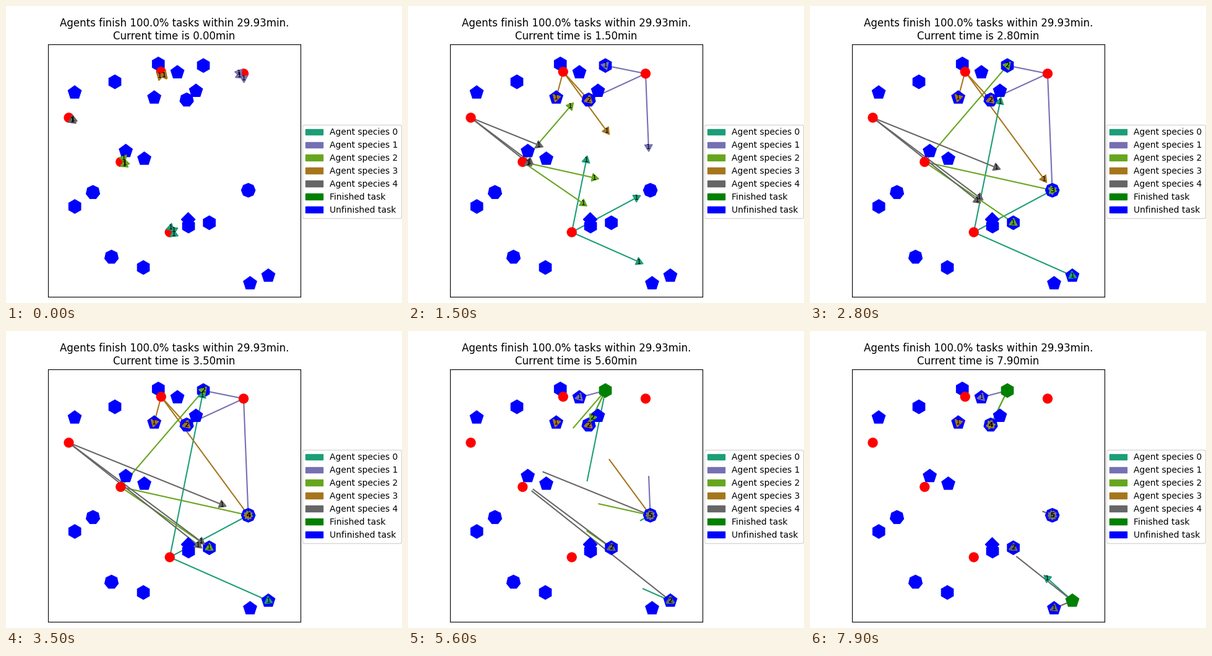
A matplotlib script that plays this animation: 640x480 px, repeating every 8000 ms.

```python
import numpy as np
import matplotlib.pyplot as plt
from matplotlib.animation import FuncAnimation
from matplotlib.patches import Circle, Patch, RegularPolygon

FRAMES, INTERVAL = 80, 100
UNIT = 408 / 110          # pixels per map unit
SPEED = 2 * UNIT          # pixels per step
TRAIL = 40                # steps of visible path

COLORS = plt.get_cmap("Dark2")(np.linspace(0, 1, 5))
DEPOTS = [(264.7, 365.6), (384, 109.3), (185.3, 252), (250.7, 106.2), (101.5, 180.5)]

# Tasks that agents visit
NORTH, MID = (319, 96.2), (328.6, 350.3)
TOP, LEFT = (277, 107.3), (239.6, 148.1)
SOUTH, CORNER = (424, 436), (394.5, 448.3)
HEPTA, EAST = (292, 151.7), (391.6, 297.8)

# All tasks by number of sides
TASKS = {
    4: [(294.5, 345)],
    5: [TOP, LEFT, SOUTH, CORNER, (111, 140), (307, 137.3), (193.6, 234.6), (223.5, 247)],
    6: [NORTH, MID, (246.2, 93.7), (176, 122.5), (111.2, 324), (295, 355.7), (222, 422.6)],
    7: [HEPTA, (140.5, 301.2), (170.5, 405.7)],
    8: [EAST],
}

# Species sent to each task, then the work and next stops once the team is complete
TEAMS = {NORTH: (0, 1, 2), EAST: range(5), SOUTH: (0, 4),
         HEPTA: (1, 3), MID: (2, 4), LEFT: (3,)}
WORK = {NORTH: 13.4, SOUTH: 17.2}
NEXT = {NORTH: (HEPTA, TOP, HEPTA), SOUTH: (MID, CORNER)}


def duration(a, b):
    return np.hypot(*np.subtract(b, a)) / SPEED


def release(task):
    """Step at which a task is done: last arrival plus its work."""
    return max(duration(DEPOTS[s], task) for s in TEAMS[task]) + WORK[task]


RELEASE = {task: release(task) for task in WORK}
SHOWN = {task: int(np.ceil(t)) + 1 for task, t in RELEASE.items()}


def leg(a, b, leave, steps):
    """Positions and heading of a straight trip."""
    done = np.clip((steps - leave) / duration(a, b), 0, 1)
    gap = np.subtract(b, a)
    return a + done[:, None] * gap, np.arctan2(gap[1], gap[0])


def travel(depot, task, follow):
    """Position and heading of one agent at every step."""
    steps = np.arange(FRAMES + 1)
    points, angle = leg(depot, task, 0, steps)
    heading = np.full(FRAMES + 1, angle)
    if follow:
        first = SHOWN[task]
        points[first:], heading[first:] = leg(task, follow, RELEASE[task], steps[first:])
    return points, heading


fig = plt.figure(figsize=(6.4, 4.8), dpi=100)
ax = fig.add_axes([68 / 640, 0.02, 408 / 640, 0.85])
ax.set(xlim=(68, 476), ylim=(470.4, 62.4), xticks=[], yticks=[])
title = ax.set_title("")

handles = [Patch(color=c, label=f"Agent species {i}") for i, c in enumerate(COLORS)]
handles += [Patch(color="green", label="Finished task"),
            Patch(color="blue", label="Unfinished task")]
ax.legend(handles=handles, loc="upper left", bbox_to_anchor=(0.99, 0.7))

shapes = {}
for sides, spots in TASKS.items():
    for spot in spots:
        shapes[spot] = ax.add_patch(RegularPolygon(
            spot, sides, radius=3 * UNIT, orientation=np.pi, color="blue", zorder=2))
for depot in DEPOTS:
    ax.add_patch(Circle(depot, 2 * UNIT, color="red", zorder=3))

agents = []
for species, (color, depot) in enumerate(zip(COLORS, DEPOTS)):
    for task, team in TEAMS.items():
        if species not in team:
            continue
        follow = NEXT[task][team.index(species)] if task in NEXT else None
        points, heading = travel(depot, task, follow)
        line, = ax.plot([], [], color=color, lw=1.5, zorder=1)
        body = ax.add_patch(RegularPolygon(depot, 3, radius=2 * UNIT,
                                           color=color, zorder=4))
        label = ax.text(*depot, "1", fontsize=8, ha="center", va="center", zorder=5)
        agents.append((points, heading, line, body, label))


def update(frame):
    step = frame + 1
    title.set_text("Agents finish 100.0% tasks within 29.93min.\n"
                   f"Current time is {frame / 10:.2f}min")
    for task, shown in SHOWN.items():
        shapes[task].set_color("green" if step >= shown else "blue")
    now = np.array([points[step] for points, *_ in agents])
    for points, heading, line, body, label in agents:
        line.set_data(*points[max(0, step - TRAIL):step + 1].T)
        body.xy = tuple(points[step])
        body.orientation = heading[step] - np.pi / 2
        label.set_position(points[step])
        label.set_text(str(np.isclose(now, points[step]).all(axis=1).sum()))
    return []


anim = FuncAnimation(fig, update, frames=FRAMES, interval=INTERVAL,
                     repeat=True, repeat_delay=0)
plt.show()
```
